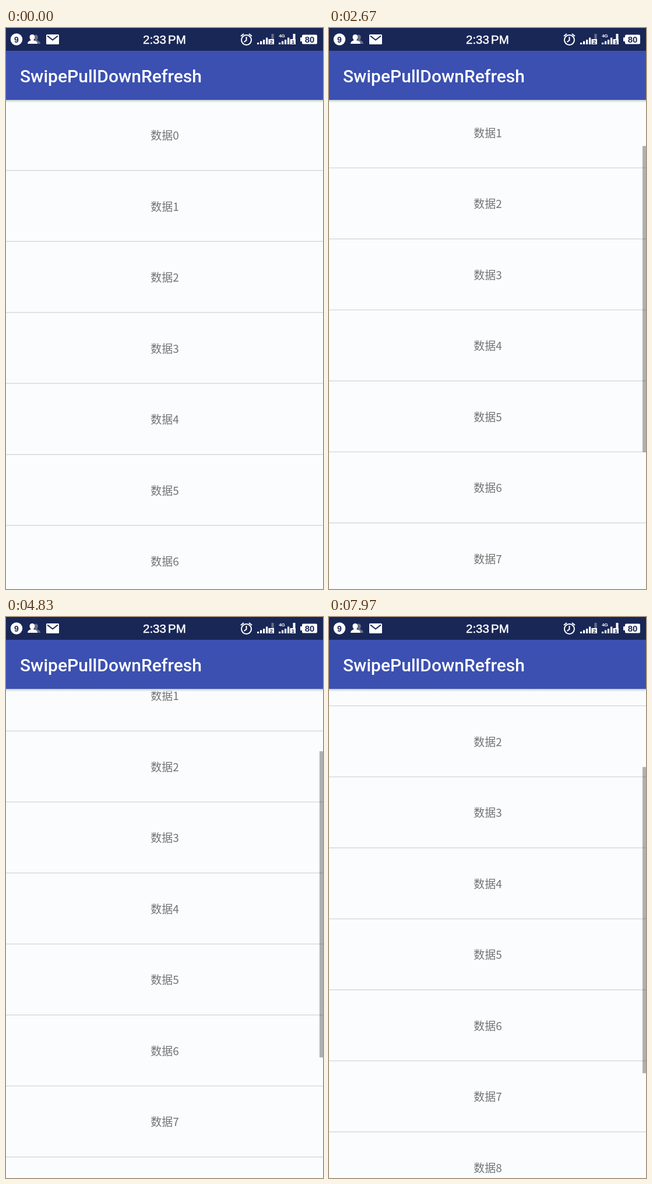
An HTML page for the animation above (8000 ms loop, 544x960 px).

```html
<!DOCTYPE html>
<html lang="zh">
<head>
<meta charset="utf-8">
<title>SwipePullDownRefresh</title>
<style>
  html, body { margin: 0; width: 100%; height: 100%; overflow: hidden; background: #fafcfd; }
  svg { display: block; width: 100%; height: 100%; }
  .cjk { font-family: "Noto Sans CJK SC", "Noto Sans CJK", sans-serif; }
  .row { font-size: 19px; font-weight: 300; fill: #737373; text-anchor: middle; }
  .more { font-size: 21px; font-weight: 500; fill: #a6a8a6; }
  .title { font: 500 30px Roboto, sans-serif; fill: #fff; }
  .clock { font: 500 20.5px "Liberation Sans", Arial, sans-serif; fill: #fff; stroke: #fff; stroke-width: .5; }
  .tiny { font-family: "Liberation Sans", Arial, sans-serif; font-weight: 700; text-anchor: middle; }
</style>
</head>
<body>
<svg viewBox="0 0 544 960" preserveAspectRatio="none">
  <defs>
    <linearGradient id="shade" x2="0" y2="1">
      <stop offset="0" stop-color="#c3c9c6"/>
      <stop offset=".45" stop-color="#e4e9e6"/>
      <stop offset="1" stop-color="#fafcfd" stop-opacity="0"/>
    </linearGradient>
  </defs>
  <rect width="544" height="960" fill="#fafcfd"/>
  <g id="list">
    <g id="rows"></g>
    <rect y="1337.5" width="544" height="300" fill="#ebf0ec"/>
    <rect y="1337" width="544" height="1.5" fill="#d3d8d2"/>
    <rect y="1397.5" width="544" height="1.5" fill="#d3d8d2"/>
    <g id="spin"></g>
    <text class="cjk more" x="223" y="1376">正在加载中...</text>
  </g>
  <g id="puck">
    <circle r="32.5" fill="#e6eae6"/>
    <circle r="30" cy="-.5" fill="#f9faf9"/>
  </g>
  <rect id="bar" x="538" width="6" fill="#000" fill-opacity=".3"/>

  <rect y="123" width="544" height="6" fill="url(#shade)"/>
  <rect width="544" height="123" fill="#3b50b0"/>
  <rect width="544" height="39" fill="#192757"/>
  <text class="title" x="24" y="93">SwipePullDownRefresh</text>

  <g fill="#fff">
    <circle cx="18" cy="19.5" r="10.2"/>
    <text class="tiny" x="18" y="24.5" font-size="14" fill="#192757">9</text>
    <path d="M49 12c5-2 8 4 4 9 4 1 6 3 6 6h-9z" fill="#687086"/>
    <path d="M45 11c5 0 6 6 2 10 5 1 7 3 7 6H37c0-3 2-5 6-6-4-4-3-10 2-10z"/>
    <rect x="69" y="11" width="22" height="17" rx="1.5"/>
    <path d="M71 13.500l9 7 9-7" fill="none" stroke="#192757" stroke-width="2"/>
    <text class="clock" x="235" y="27">2:33</text>
    <text class="clock" x="278" y="27">PM</text>
    <g fill="none" stroke="#fff" stroke-width="2">
      <circle cx="412.500" cy="20.500" r="8.500"/>
      <path d="M412.500 15v6l-4 3M403 14l5-4M422 14l-5-4"/>
    </g>
    <g id="signals"></g>
    <text class="tiny" x="473.500" y="16" font-size="8">4G</text>
    <rect x="505" y="16" width="4" height="7" rx="1"/>
    <rect x="508" y="11.500" width="26" height="16" rx="2"/>
    <text class="tiny" x="521" y="25" font-size="15" fill="#192757">80</text>
  </g>
</svg>
<script>
const NS = 'http://www.w3.org/2000/svg';
const LOOP = 8000, PITCH = 121.5, TOP = 123;
const $ = id => document.getElementById(id);

function add(parent, tag, attrs, text) {
  const el = document.createElementNS(NS, tag);
  for (const k in attrs) el.setAttribute(k, attrs[k]);
  if (text !== undefined) el.textContent = text;
  parent.appendChild(el);
  return el;
}

for (let i = 0; i < 10; i++) {
  const y = TOP + i * PITCH;
  add($('rows'), 'text', { class: 'cjk row', x: 272.5, y: y + 68 }, '数据' + i);
  if (i < 9) add($('rows'), 'rect', { y: y + 120, width: 544, height: 1.5, fill: '#d8ddd6' });
}

// Ring whose tone runs from pale to dark around the turn
const SEG = 24;
for (let i = 0; i < SEG; i++) {
  const pt = k => {
    const a = k / SEG * 2 * Math.PI;
    return `${10.3 * Math.cos(a)} ${10.3 * Math.sin(a)}`;
  };
  add($('spin'), 'path', {
    d: `M${pt(i)}A10.3 10.3 0 0 1 ${pt(i + 1.1)}`, fill: 'none', stroke: '#5f625f',
    'stroke-width': 4, 'stroke-opacity': 0.12 + 0.8 * i / SEG
  });
}

function signal(x, label, lastTop, lastFill) {
  const g = $('signals');
  [3, 5.5, 8, 11.5].forEach((h, i) =>
    add(g, 'rect', { x: x + i * 5, y: 28 - h, width: 3.2, height: h }));
  add(g, 'rect', { x: x + 24.5, y: lastTop, width: 4, height: 28 - lastTop, fill: lastFill });
  add(g, 'rect', { x: x + 19.5, y: 19, width: 9.5, height: 9 });
  add(g, 'text', { class: 'tiny', x: x + 24.3, y: 27, 'font-size': 9.5, fill: '#192757' }, label);
}
signal(431, '2', 10, '#687086');
signal(468, '1', 10, '#fff');

// Monotone cubic curve through [time, value] keys
function curve(keys) {
  const n = keys.length;
  const slope = i => (keys[i + 1][1] - keys[i][1]) / (keys[i + 1][0] - keys[i][0]);
  const tan = keys.map((_, i) => {
    if (i === 0 || i === n - 1) return 0;
    const a = slope(i - 1), b = slope(i);
    return a * b > 0 ? 2 * a * b / (a + b) : 0;
  });
  return t => {
    if (t <= keys[0][0]) return keys[0][1];
    if (t >= keys[n - 1][0]) return keys[n - 1][1];
    let i = 0;
    while (t > keys[i + 1][0]) i++;
    const [t0, v0] = keys[i], [t1, v1] = keys[i + 1];
    const d = t1 - t0, u = (t - t0) / d, w = 1 - u;
    return w * w * ((1 + 2 * u) * v0 + u * d * tan[i]) +
           u * u * ((3 - 2 * u) * v1 - w * d * tan[i + 1]);
  };
}

const scrollAt = curve([
  [2450, 0], [2650, 110], [2900, 345], [3100, 450], [3270, 477], [3330, 479.5],
  [4100, 512], [4370, 512], [4600, 375], [4830, 171], [5070, 0],
  [7560, 0], [7720, 45], [7970, 212.5], [8040, 265]
]);
const puckAt = curve([[6100, 88], [6300, 123], [6370, 127], [6590, 88]]);
const clamp = v => Math.max(0, Math.min(1, v));

function barAlpha(t) {
  if (t < 2450) return 0;
  if (t < 5370) return 1;
  return t < 7560 ? clamp((5620 - t) / 250) : 1;
}

function draw(t) {
  const s = scrollAt(t);
  $('list').setAttribute('transform', `translate(0 ${-s})`);
  $('spin').setAttribute('transform', `translate(195 1367.5) rotate(${(t - 3270) * 0.27 + 150})`);
  $('puck').setAttribute('transform', `translate(272 ${puckAt(t)})`);

  // The thumb stretches to the bottom edge as the footer comes into view
  const y = TOP + s * 0.627;
  const end = y + 524 + (960 - y - 524) * clamp((s - 377) / 60);
  $('bar').setAttribute('y', y);
  $('bar').setAttribute('height', Math.min(960, end) - y);
  $('bar').setAttribute('opacity', barAlpha(t));
}

function tick() {
  draw(performance.now() % LOOP);
  requestAnimationFrame(tick);
}
tick();
</script>
</body>
</html>
```
